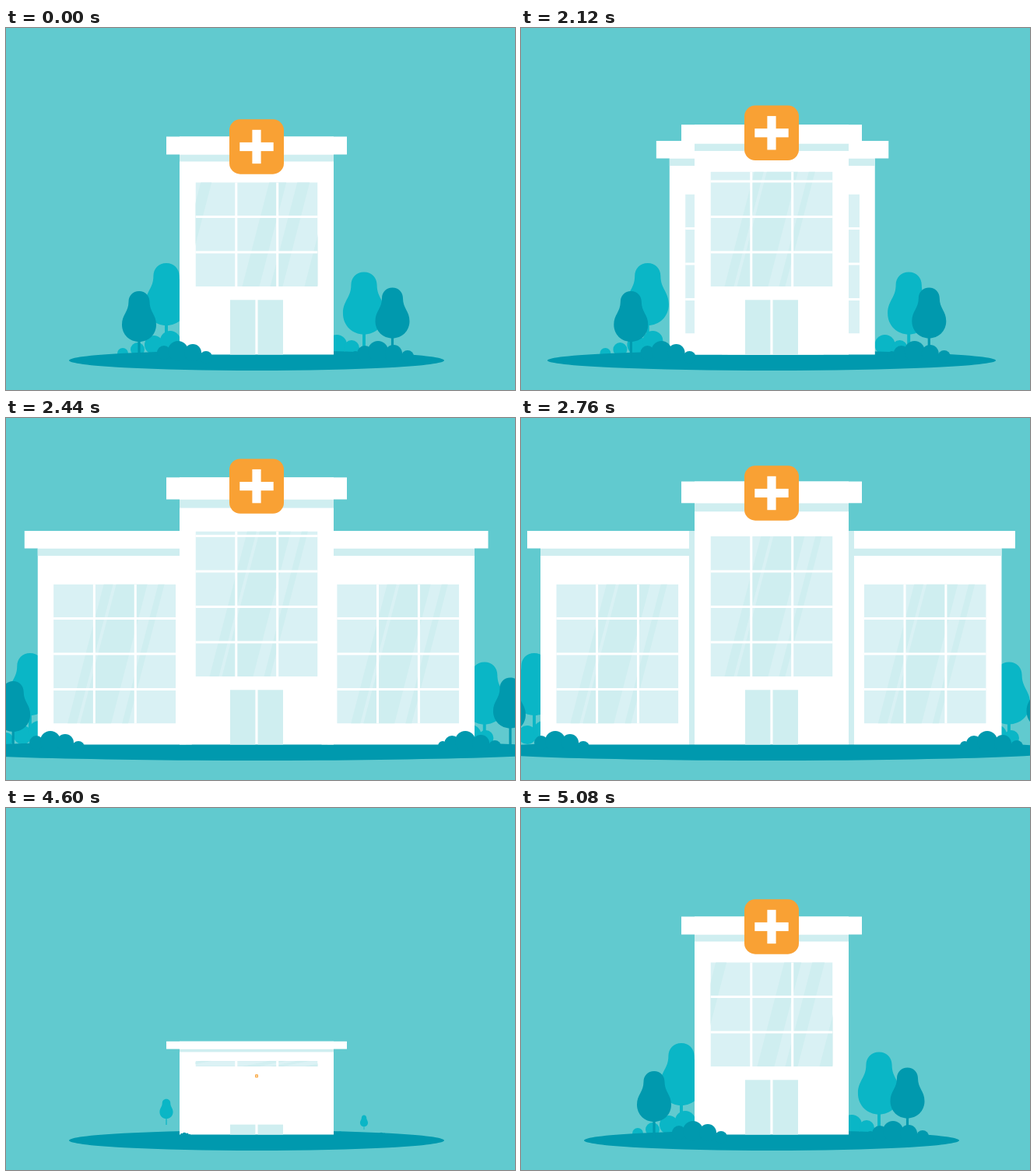
Animation, 654 px wide and 465 px high, one loop 5.68 s. Source, as an HTML page with a canvas:

```html
<!DOCTYPE html>
<html lang="en">
<head>
<meta charset="utf-8">
<title>Growing hospital</title>
<style>
  html, body { margin: 0; width: 100%; height: 100%; overflow: hidden; background: #61cacf; }
  canvas { display: block; }
</style>
</head>
<body>
<canvas width="654" height="465"></canvas>
<script>
const ctx = document.querySelector('canvas').getContext('2d');
const LOOP = 5680, STEP = 40, EXPAND = 1920, BUILD = 4280;
const SKY = '#61cacf', TEAL = '#0ab6c6', DARK = '#0099ae', WHITE = '#fff';
const SHADE = '#cfeef0', GLASS = '#d9f1f4', ORANGE = '#f9a134', GLINT = '#7ad0d7';

// Shine bands as [left, right] offsets along the bottom edge of a window.
const REST_SHINE = [[-28, -14], [60, 82], [96, 112], [140, 157]];
const WIDE_SHINE = [[18, 30], [34, 74], [88, 96]];

const ease = p => (1 - Math.cos(Math.PI * Math.min(1, Math.max(0, p)))) / 2;
const mix = (a, b, p) => a + (b - a) * p;

// Rises from 0 to peak, then settles at 1.
function swing(t, start, rise, fall, peak) {
  const u = t - start;
  return u < rise ? peak * ease(u / rise) : mix(peak, 1, ease((u - rise) / fall));
}

function box(x1, y1, x2, y2, color) {
  ctx.fillStyle = color;
  ctx.fillRect(x1, y1, x2 - x1, y2 - y1);
}

function slanted(x1, x2, top, bottom, slope, color) {
  const lean = (bottom - top) * slope;
  ctx.fillStyle = color;
  ctx.beginPath();
  ctx.moveTo(x1, bottom);
  ctx.lineTo(x1 + lean, top);
  ctx.lineTo(x2 + lean, top);
  ctx.lineTo(x2, bottom);
  ctx.fill();
}

function scaled(x, y, sx, sy, draw) {
  if (sx <= 0 || sy <= 0) return;
  ctx.save();
  ctx.translate(x, y);
  ctx.scale(sx, sy);
  ctx.translate(-x, -y);
  draw();
  ctx.restore();
}

function tree(x, top, size, root, color, scale) {
  scaled(x, root, scale, scale, () => {
    box(x - 1.6 * size, top + 60 * size, x + 1.6 * size, root, color);
    ctx.translate(x, top);
    ctx.scale(size, size);
    ctx.beginPath();
    for (const side of [1, -1]) {
      ctx.moveTo(0, 0);
      ctx.bezierCurveTo(8 * side, 0, 13.5 * side, 6, 13.5 * side, 13.5);
      ctx.bezierCurveTo(13.5 * side, 27, 22 * side, 30, 22 * side, 43);
      ctx.bezierCurveTo(22 * side, 56, 12 * side, 65, 0, 65);
    }
    ctx.fill();
  });
}

function bush(circles, shift, center, color, scale) {
  scaled(center + shift, 420, scale, scale, () => {
    ctx.fillStyle = color;
    for (const [x, y, r] of circles) {
      ctx.beginPath();
      ctx.arc(x + shift, y, r, 0, 2 * Math.PI);
      ctx.fill();
    }
  });
}

function pane(x, top, bottom, shine) {
  const right = x + 157;
  ctx.save();
  ctx.beginPath();
  ctx.rect(x, top, 157, bottom - top);
  ctx.clip();
  box(x, top, right, bottom, GLASS);
  for (const [a, b] of shine) slanted(x + a, x + b, top, bottom, 0.26, SHADE);
  for (const dx of [52.3, 105.2]) box(x + dx - 1.5, top, x + dx + 1.5, bottom, WHITE);
  for (let y = bottom - 44; y > top; y -= 45.5) box(x, y - 1.5, right, y + 1.5, WHITE);
  ctx.restore();
}

function wing(wall, roof, inner, tower, paneX, shift) {
  ctx.save();
  ctx.translate(shift, 0);
  box(inner, 145, tower, 419.5, SHADE);
  box(wall, 145, inner, 419.5, WHITE);
  box(wall, 167.5, inner, 177, SHADE);
  box(roof, 145, inner, 167.5, WHITE);
  pane(paneX, 213.5, 392.5, WIDE_SHINE);
  ctx.restore();
}

function sign(y, scale) {
  scaled(322, y, scale, scale, () => {
    ctx.fillStyle = ORANGE;
    ctx.beginPath();
    ctx.roundRect(287, y - 35.2, 70, 70.4, 14);
    ctx.fill();
    box(300.3, y - 5.6, 343.7, y + 5.6, WHITE);
    box(316.4, y - 21.7, 327.6, y + 21.7, WHITE);
  });
}

function render(t) {
  const wide = t >= EXPAND && t < BUILD;
  const pop = (start, peak = 1.12) => t < BUILD ? 1 : swing(t, start, 280, 200, peak);
  const stretch = rise => wide ? swing(t, EXPAND, rise, 200, 1.19) : 0;
  const slide = wide ? ease((t - EXPAND) / 630) : 0;
  const lateSlide = wide ? ease((t - EXPAND - 33) / 640) : 0;
  const lift = stretch(580);

  box(0, 0, 654, 465, SKY);

  // Back greenery
  tree(206 - 189 * slide, 302, 1.23, 407, TEAL, pop(4500));
  tree(460 + 167 * slide, 313.5, 1.23, 413, TEAL, pop(4525));
  bush([[150, 418, 7], [169, 413, 9], [190, 407, 12], [211, 402, 13]],
    -182 * slide, 190, TEAL, pop(4565));
  bush([[425, 407, 13], [444, 411, 10]], 186 * slide, 430, TEAL, pop(4525));

  // Ground
  const ground = t < BUILD ? 1 : ease((t - BUILD) / 280);
  ctx.fillStyle = DARK;
  ctx.beginPath();
  ctx.ellipse(322, 427, mix(241, 390, lift) * ground, 13 * ground, 0, 0, 2 * Math.PI);
  ctx.fill();

  tree(171 - 187 * lateSlide, 338, 1, 424, DARK, pop(4570));
  tree(496.5 + 175 * lateSlide, 333.5, 1, 431, DARK, pop(4602));

  // Wings
  if (wide) {
    wing(25, 8, 216, 223, 45.3, 215 * (1 - slide));
    wing(617.5, 635, 428, 421, 440.7, -211 * (1 - slide));
  }

  // Tower
  if (t >= 4720 && t < 4840) {
    for (const [a, b] of [[267, 284], [351, 374], [390, 416]]) {
      slanted(a, b, 105, 112, 0.27, GLINT);
    }
  }
  const built = pop(4480, 1.1);
  scaled(322, 419.5, 1, built * (1 + 0.207 * stretch(640)), () => {
    box(223, 139.5, 421, 419.5, WHITE);
    box(223, 162.5, 421, 171.5, SHADE);
    box(206, 139.5, 438, 162.5, WHITE);
  });
  scaled(322, 332, 1, pop(4560, 1.1), () =>
    pane(243.5, 198.3 - 46.3 * stretch(600), 332, wide ? WIDE_SHINE : REST_SHINE));
  scaled(322, 419.5, 1, pop(4525, 1.1), () => {
    box(288, 349.3, 320.4, 419.5, SHADE);
    box(323.5, 349.3, 356, 419.5, SHADE);
  });
  sign(152.5 - 56 * lift - 335 * (built - 1), pop(4560, 1.1));

  // Front bushes
  bush([[203, 417, 9], [221, 415, 13], [240, 417, 11], [257, 423, 8]],
    -177 * slide, 231, DARK, pop(4525));
  bush([[449, 421, 6], [461, 418, 10], [478, 415, 13], [498, 418, 11], [516, 422, 8]],
    121 * slide, 483, DARK, pop(4525));
}

function frame() {
  const t = performance.now() % LOOP;
  render(Math.floor(t / STEP) * STEP);
  requestAnimationFrame(frame);
}
frame();
</script>
</body>
</html>
```
